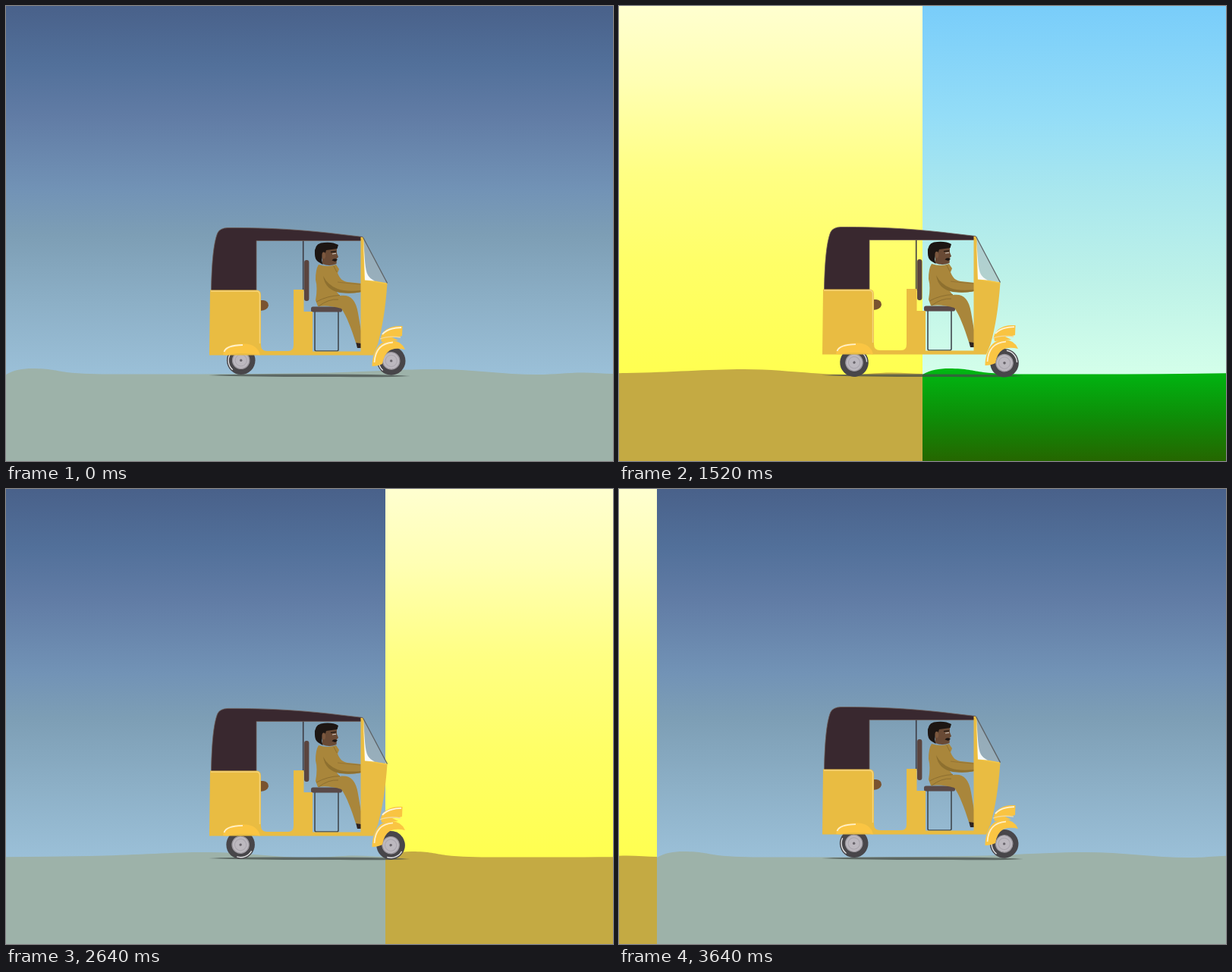
Animation, 800 px wide and 600 px high, one loop 3680 ms. Source, as an HTML page:

```html
<!DOCTYPE html>
<html lang="en">
<head>
<meta charset="utf-8">
<title>Rickshaw ride</title>
<style>
  html, body { margin: 0; width: 100%; height: 100%; overflow: hidden; }
  svg { display: block; width: 800px; height: 600px; }
</style>
</head>
<body>
<svg viewBox="0 0 800 600" width="800" height="600">
  <defs>
    <linearGradient id="duskSky" gradientUnits="userSpaceOnUse" x1="0" y1="0" x2="0" y2="487">
      <stop offset="0" stop-color="#49618a"/>
      <stop offset=".16" stop-color="#52709a"/>
      <stop offset=".3" stop-color="#617ca5"/>
      <stop offset=".5" stop-color="#7293b6"/>
      <stop offset=".62" stop-color="#7d9eb5"/>
      <stop offset=".8" stop-color="#8cafc6"/>
      <stop offset="1" stop-color="#9bc0d8"/>
    </linearGradient>
    <linearGradient id="sandSky" gradientUnits="userSpaceOnUse" x1="0" y1="0" x2="0" y2="487">
      <stop offset="0" stop-color="#ffffd0"/>
      <stop offset=".2" stop-color="#ffffb4"/>
      <stop offset=".45" stop-color="#ffff84"/>
      <stop offset=".7" stop-color="#ffff67"/>
      <stop offset="1" stop-color="#ffff50"/>
    </linearGradient>
    <linearGradient id="fieldSky" gradientUnits="userSpaceOnUse" x1="0" y1="0" x2="0" y2="487">
      <stop offset="0" stop-color="#79cdfa"/>
      <stop offset=".3" stop-color="#94ddf7"/>
      <stop offset=".5" stop-color="#a9e7ee"/>
      <stop offset=".75" stop-color="#bef2e8"/>
      <stop offset="1" stop-color="#d4ffea"/>
    </linearGradient>
    <linearGradient id="grass" gradientUnits="userSpaceOnUse" x1="0" y1="480" x2="0" y2="600">
      <stop offset="0" stop-color="#00b712"/>
      <stop offset=".5" stop-color="#0d8f08"/>
      <stop offset="1" stop-color="#256600"/>
    </linearGradient>
    <path id="hills" d="M0 486C10 480 22 478 35 478C58 478 66 481 80 483C105 486 135 485.5 170 485.5C250 485.5 330 485.5 410 484C470 483 515 479 565 479C615 479 655 486 700 486C725 486 738 483.5 760 483.5C775 483.5 788 485 801 485V600H0Z"/>
    <g id="dusk"><rect width="801" height="600" fill="url(#duskSky)"/><use href="#hills" fill="#9db2a9"/></g>
    <g id="sand"><rect width="801" height="600" fill="url(#sandSky)"/><use href="#hills" fill="#c4aa43"/></g>
    <g id="field"><rect width="801" height="600" fill="url(#fieldSky)"/><use href="#hills" fill="url(#grass)"/></g>
    <g id="wheel">
      <circle r="18.8" fill="#48464a"/>
      <path d="M-14.5-8A16.6 16.6 0 0 0-11 12.5" fill="none" stroke="#e4e4e6" stroke-width="1.4"/>
      <circle r="11.2" fill="#bcb8bf" stroke="#99959c" stroke-width="1.2"/>
      <circle r="7.6" fill="none" stroke="#a9a5ad"/>
      <circle r="1.7" fill="#69656c"/>
    </g>
  </defs>

  <g id="strip"></g>

  <path d="M267 487Q300 485 400 485.6Q500 485.4 533 488Q500 490 440 489Q330 489.4 267 487Z" fill="#434c48" opacity=".72"/>
  <use id="rear" href="#wheel"/>
  <use id="front" href="#wheel"/>

  <g id="body">
    <!-- seat and pole -->
    <path d="M391.7 308V376" stroke="#3c3b43" stroke-width="1.6"/>
    <rect x="393" y="335" width="6.4" height="54" rx="3" fill="#5b453f"/>
    <rect x="407" y="402" width="31" height="53" rx="2" fill="none" stroke="#40484e" stroke-width="1.6"/>
    <rect x="402" y="396.5" width="41" height="7" rx="2.6" fill="#594a49"/>

    <!-- driver -->
    <path d="M416 319L436 318V326L438 331L436 333L435.5 340Q426 344 417 340Z" fill="#694a35"/>
    <path d="M407 327Q406 315 415 312.5Q429 310 438 315L436.5 320L422 322L420.5 327L417.5 327L416 335L417.5 341L411 337Q407 334 407 327Z" fill="#1d1613"/>
    <ellipse cx="418.8" cy="329" rx="2.4" ry="4.4" fill="#7b573e"/>
    <path d="M428 324.5L435 323.5" stroke="#211813" stroke-width="1.3"/>
    <path d="M430 327L435 326.3" stroke="#d5cdc4" stroke-width="1"/>
    <path d="M429.5 335.5Q432 331.5 437 334.5L434 337Z" fill="#1d1613"/>
    <path d="M461 443L468 442V451L463 451Z" fill="#2e2320"/>
    <path d="M412 341Q424 345 435 341L439 347L437 352C440 360 444 363 450 364L469 366V377C453 380 442 378 435 376L440 382C453 380 461 386 464 405L470 440L468 445L461 444C455 425 449 409 442 399Q426 394 411 396L408 388Q411 372 408 361Q408 347 412 341Z" fill="#a9863b"/>
    <path d="M418 356C420 369 428 376 440 378Q455 380 468 377L468 375Q448 377 437 373Q424 368 418 356Z" fill="#8e702f"/>
    <path d="M409 390Q424 382 440 381.5M412 396Q425 386 438 387M432 343L436 351" fill="none" stroke="#8c6e30" stroke-width="1"/>
    <path d="M437 364Q443 365 467 367" fill="none" stroke="#947434" stroke-width="1"/>

    <!-- door handle -->
    <path d="M335 388H339Q346 389 346 395Q345 401 335 402Z" fill="#7a5330"/>

    <!-- roof -->
    <path d="M270.5 376C271 345 273 313 279 299Q282 293 292 292.5C350 292 400 296 440 301L470 304.5V309.5H330V376Z" fill="#39282f" stroke="#6d5b55" stroke-width=".8"/>

    <!-- shell -->
    <path d="M269 374.5H330Q336 374.5 336 381V447Q336 455 344 455H372Q379 455 379 447V374H392.5V403H404V455.5H467.5V305H471L473 361L502.5 366C500 400 496 424 490 446L484 460.5H268Z" fill="#e9bc42"/>
    <path d="M270 376H330Q334.5 376 334.5 381V445" fill="none" stroke="#f6d47b" stroke-width="1.5"/>
    <path d="M467.8 305.5L471 306L473 361L502 366" fill="none" stroke="#f7c844" stroke-width="1.5"/>

    <!-- windscreen -->
    <path d="M471 307L502 365L474 361Z" fill="#aab4b9" opacity=".52"/>
    <path d="M471 310C473 332 473 348 477 355Q480 360 486 362.5L473 361.5Z" fill="#f8faf8"/>
    <path d="M470.5 305L502.5 365.5" stroke="#5e6265" stroke-width="1.3"/>

    <!-- mudguards -->
    <path d="M286 460Q286 452 294 448Q302 445 316 445.5Q332 447 335 460.5Q325 458 310 458Q297 458 292 460.5Z" fill="#fac543"/>
    <path d="M287.5 456Q290 447.5 312 447" fill="none" stroke="#fff1cb" stroke-width="1.8"/>
    <path d="M494 437C497 426 507 421.5 522.5 422L522 435Q514 437 509 437L517 441L495 443Z" fill="#f9c442"/>
    <path d="M496 433Q503 424.5 521 424" fill="none" stroke="#fff4d8" stroke-width="1.8"/>
    <path d="M493 439Q504 434.5 520 437" fill="none" stroke="#f3d99a" stroke-width="1.4"/>
    <path d="M482.5 475C483 455 492 441 507 441Q521 441 526 453Q514 450 506 454Q498 459 496 472Q490 475 482.5 475Z" fill="#fac543"/>
    <path d="M485.5 470Q487 445 510 443.5" fill="none" stroke="#fff0c6" stroke-width="1.8"/>
  </g>
</svg>
<script>
  const LOOP = 3680, STEP = 40, WIDTH = 800, LIFT = 5, LIFT_RESET = 1000;
  const scenes = ["dusk", "sand", "field", "dusk", "sand", "dusk"];
  const legs = [1200, 640, 560, 640, 640]; // ms to cross each scene
  const get = id => document.getElementById(id);
  const strip = get("strip"), body = get("body");

  scenes.forEach((name, i) => {
    const use = document.createElementNS("http://www.w3.org/2000/svg", "use");
    use.setAttribute("href", "#" + name);
    use.setAttribute("x", i * WIDTH);
    strip.append(use);
  });

  const place = (el, x, y, turn = 0) =>
    el.setAttribute("transform", `translate(${x} ${y}) rotate(${turn})`);

  function travel(t) {
    let i = 0;
    while (t >= legs[i]) t -= legs[i++];
    return (i + t / legs[i]) * WIDTH;
  }

  function lift(t) {
    const k = t < LIFT_RESET ? t / LIFT_RESET : (t - LIFT_RESET) / (LOOP - LIFT_RESET);
    return -LIFT * k;
  }

  // Wheels turn once per loop around a slightly off-centre axle.
  function roll(el, x, y, turn) {
    const a = turn * Math.PI / 180;
    place(el, x + 0.6 * Math.sin(a), y - 1.5 * Math.cos(a), turn);
  }

  function draw(now) {
    const t = Math.floor((now % LOOP) / STEP) * STEP;
    const turn = 360 * t / LOOP;
    place(strip, -travel(t), 0);
    place(body, 0, lift(t));
    roll(get("rear"), 309.7, 468.8, turn);
    roll(get("front"), 507.7, 469.4, turn);
  }

  const start = performance.now();
  function tick() {
    draw(performance.now() - start);
    requestAnimationFrame(tick);
  }
  tick();
</script>
</body>
</html>
```
